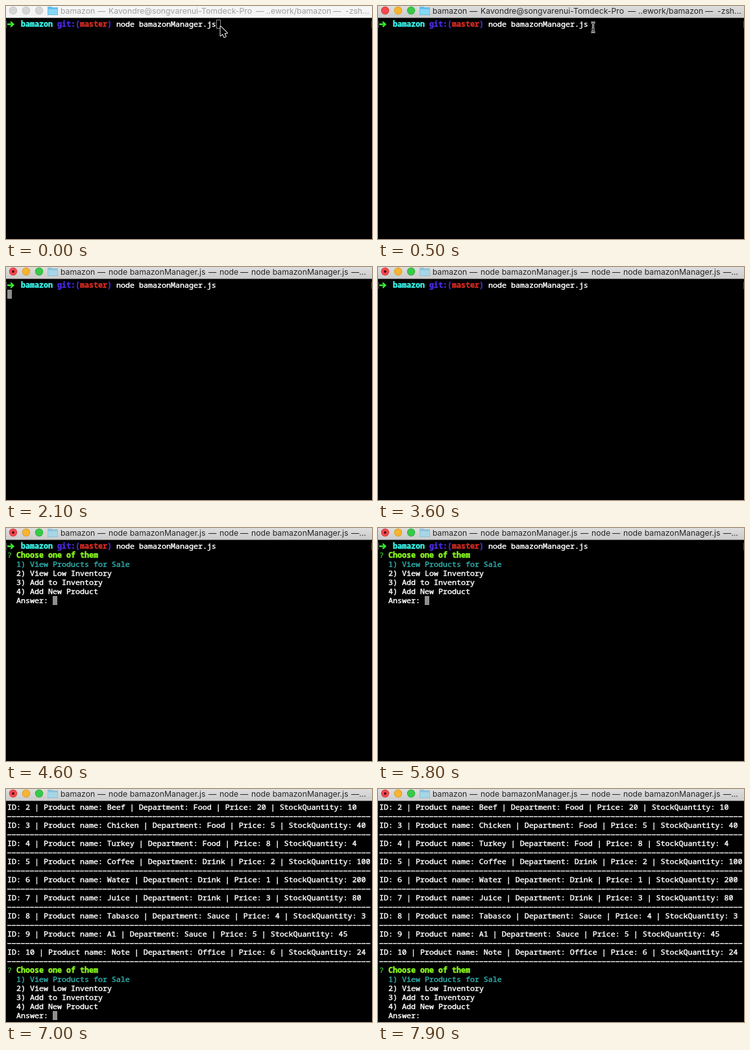
Recreate the animation shown at these times as an HTML page with a canvas. Size 564x360 px, loop 8000 ms.

```html
<!DOCTYPE html>
<html lang="en">
<head>
<meta charset="utf-8">
<title>Terminal session</title>
<style>
  html, body { margin: 0; width: 100%; height: 100%; overflow: hidden; background: #000; }
  canvas { display: block; }
</style>
</head>
<body>
<canvas id="stage" width="564" height="360"></canvas>
<script>
const ctx = document.getElementById('stage').getContext('2d');
const LOOP = 8000, COL = 7, ROW = 14, LEFT = 2, TOP = 21;
const WHITE = '#fff', TEAL = '#2fb0ae';
const MONO = '11.667px "Noto Sans Mono", monospace';

// Key moments in ms
const FOCUS = 400, ENTER = 1700, RUN = 2000, MENU = 4500, TYPED = 6200, OUTPUT = 7000;

const SHELL_TITLE = [
  [84, 'bamazon'], [141, '—'], [158, 'Kavondre@songvarenui-Tomdeck-Pro'], [385, '—'],
  [401, '..ework/bamazon'], [504, '—'], [523, '-zsh...']
];
const NODE_TITLE = [
  [84, 'bamazon'], [141, '—'], [158, 'node bamazonManager.js'], [312, '—'], [329, 'node'],
  [361, '—'], [378, 'node bamazonManager.js'], [532, '—...']
];
const CHOICES = ['View Products for Sale', 'View Low Inventory', 'Add to Inventory', 'Add New Product'];
const PRODUCTS = [
  ['Beef', 'Food', 20, 10], ['Chicken', 'Food', 5, 40], ['Turkey', 'Food', 8, 4],
  ['Coffee', 'Drink', 2, 100], ['Water', 'Drink', 1, 200], ['Juice', 'Drink', 3, 80],
  ['Tabasco', 'Sauce', 4, 3], ['A1', 'Sauce', 5, 45], ['Note', 'Office', 6, 24]
];

const between = (t, from, to) => t >= from && t < to;

function rect(x, y, w, h, color) {
  ctx.fillStyle = color;
  ctx.fillRect(x, y, w, h);
}

function disc(x, y, r, color) {
  ctx.fillStyle = color;
  ctx.beginPath();
  ctx.arc(x, y, r, 0, Math.PI * 2);
  ctx.fill();
}

function polygon(points, fill, stroke, width) {
  ctx.beginPath();
  points.forEach(([x, y]) => ctx.lineTo(x, y));
  ctx.closePath();
  if (stroke) {
    ctx.strokeStyle = stroke;
    ctx.lineWidth = width;
    ctx.stroke();
  }
  ctx.fillStyle = fill;
  ctx.fill();
}

// A thin outline gives the glyphs the heavier terminal weight
function print(col, row, text, color = WHITE, weight = 400) {
  const x = LEFT + col * COL, y = TOP + row * ROW + 11;
  ctx.font = `${weight} ${MONO}`;
  ctx.fillStyle = ctx.strokeStyle = color;
  ctx.lineWidth = 0.45;
  ctx.lineJoin = 'round';
  ctx.fillText(text, x, y);
  ctx.strokeText(text, x, y);
}

function block(col, row) {
  rect(LEFT + col * COL, TOP + row * ROW, COL, ROW, '#8f8f8f');
}

function titleBar(t) {
  const active = t >= FOCUS, running = t >= RUN;
  const shade = ctx.createLinearGradient(0, 0, 0, 18);
  shade.addColorStop(0, active ? '#dedede' : '#f6f6f6');
  shade.addColorStop(1, active ? '#cbcbcb' : '#f4f4f4');
  rect(0, 0, 564, 18, shade);
  rect(0, 18, 564, 1, active ? '#484848' : '#585858');

  const rims = active ? ['#d23a40', '#d99a2b', '#2ea83c'] : Array(3).fill('#c4c4c4');
  const fills = active ? ['#f4484f', '#f6b42f', '#36cb47'] : Array(3).fill('#d6d6d6');
  fills.forEach((fill, i) => {
    disc(11 + i * 20, 7, 6.2, rims[i]);
    disc(11 + i * 20, 7, 5.4, fill);
  });
  if (running) disc(11, 7, 2, '#4d0609');

  rect(64, 1, 7, 3, running ? '#8fc3d9' : '#62bfe8');
  rect(64, 2, 16, 12, running ? '#8fc3d9' : '#62bfe8');
  rect(65, 5, 14, 8, running ? '#a6d5e6' : '#86d6f6');

  ctx.font = '12.25px Inter, sans-serif';
  ctx.fillStyle = active ? '#262626' : '#a0a0a0';
  for (const [x, text] of running ? NODE_TITLE : SHELL_TITLE) ctx.fillText(text, x, 12);
}

function prompt() {
  rect(0, 23, 1, 11, '#484848');
  rect(563, 23, 1, 11, '#484848');
  rect(2, 27, 6, 2.4, '#3bf32e');
  polygon([[6.5, 24], [8.5, 24], [13, 28.2], [8.5, 32.4], [6.5, 32.4], [8.5, 28.2]], '#3bf32e');
  print(3, 0, 'bamazon', '#38f3e8', 'bold');
  print(11, 0, 'git:(', '#4b2be0', 'bold');
  print(16, 0, 'master', '#d42a22', 'bold');
  print(22, 0, ')', '#4b2be0', 'bold');
  print(24, 0, 'node bamazonManager.js');
}

function menu(row) {
  print(0, row, '?', '#37b52a');
  print(2, row, 'Choose one of them', '#86f71e', 'bold');
  CHOICES.forEach((choice, i) => print(2, row + 1 + i, `${i + 1}) ${choice}`, i ? WHITE : TEAL));
  print(2, row + 5, 'Answer:');
}

function productList() {
  PRODUCTS.forEach(([name, department, price, stock], i) => {
    print(0, i * 2, `ID: ${i + 2} | Product name: ${name} | Department: ${department}` +
      ` | Price: ${price} | StockQuantity: ${stock}`);
    const y = TOP + i * 2 * ROW + 21;
    for (let col = 0; col < 80; col++) rect(LEFT + col * COL, y, COL - 0.6, 1.4, '#f0f0f0');
  });
}

function textCursor(t) {
  if (t < FOCUS) {
    ctx.strokeStyle = '#8f8f8f';
    ctx.lineWidth = 1;
    ctx.strokeRect(324.5, 21.5, 6, 13);
  } else if (t < ENTER) {
    if (t < 500 || between(t, 1000, 1500)) block(46, 0);
  } else if (t < MENU) {
    if (t < 2500 || t % 1000 < 500) block(0, 1);
  } else if (t < TYPED) {
    if (t < 5000 || between(t, 5500, 6000)) block(10, 6);
  } else if (t < OUTPUT) {
    block(11, 6);
  } else if (t < 7500) {
    block(10, 23);
  }
}

function pointer(t) {
  if (t < FOCUS) {
    const arrow = [[0, 0], [0, 14.5], [3.4, 11.4], [5.8, 16.8], [8.3, 15.7], [6, 10.4], [10.4, 10.2]];
    polygon(arrow.map(([x, y]) => [x + 330.5, y + 31.5]), '#000', '#f2f2f2', 2);
  } else if (t < ENTER) {
    const p = Math.min(1, Math.max(0, (t - 500) / 1100));
    const ease = p * p * (3 - 2 * p);
    const x = 331.5 + 6 * ease, y = 33 + 40 * ease;
    for (const [color, width] of [['#e8e8e8', 3], ['#000', 1]]) {
      ctx.strokeStyle = color;
      ctx.lineWidth = width;
      ctx.beginPath();
      for (const s of [-1, 1]) {
        ctx.moveTo(x - 3, y + 7.5 * s);
        ctx.quadraticCurveTo(x, y + 7.5 * s, x, y + 5 * s);
        ctx.quadraticCurveTo(x, y + 7.5 * s, x + 3, y + 7.5 * s);
      }
      ctx.moveTo(x, y - 6);
      ctx.lineTo(x, y + 6);
      ctx.moveTo(x - 2, y + 3);
      ctx.lineTo(x + 2, y + 3);
      ctx.stroke();
    }
  }
}

function draw() {
  const t = performance.now() % LOOP;
  rect(0, 0, 564, 360, '#000');
  titleBar(t);
  if (t < OUTPUT) {
    prompt();
    if (t >= MENU) menu(1);
    if (t >= TYPED) print(10, 6, '1');
  } else {
    productList();
    menu(18);
  }
  textCursor(t);
  pointer(t);
  requestAnimationFrame(draw);
}
draw();
</script>
</body>
</html>
```
